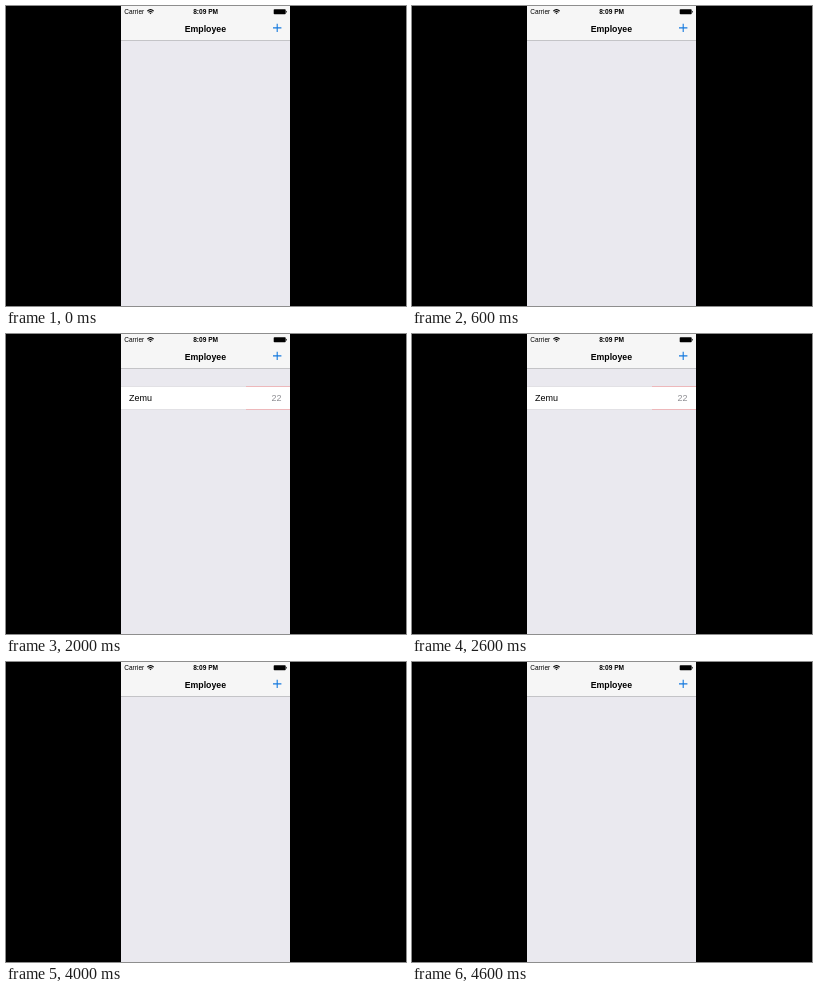
An HTML page for the animation above (5000 ms loop, 400 by 300 pixels).

```html
<!DOCTYPE html>
<html lang="en">
<head>
<meta charset="utf-8">
<title>Employee list</title>
<style>
  html, body { margin: 0; width: 100%; height: 100%; overflow: hidden; background: #000; }
  svg { display: block; width: 400px; height: 300px; }
  text { font: 9px "Liberation Sans", Arial, sans-serif; }
  .bold { font-size: 8.75px; font-weight: bold; }
  .status { font-size: 6.5px; }
  .mid { text-anchor: middle; }
  .end { text-anchor: end; }
  .blue { fill: #0a6cf5; }
  .hint { fill: #c0c0c4; }
  .grey { fill: #8e8e93; }
  .field { fill: #fff; stroke: #dcdcdc; stroke-width: .8; }
  .line { fill: #cfced4; }

  .list, .form, .row, .slide { animation: 5s step-end infinite; }
  .list { animation-name: list; }
  .form { animation-name: form; }
  .row { animation-name: row; }
  .slide { animation-name: slide; }
  @keyframes list { 0%, 40% { visibility: visible } 20% { visibility: hidden } }
  @keyframes form { 0%, 40% { visibility: hidden } 20% { visibility: visible } }
  @keyframes row { 0%, 80% { visibility: hidden } 40% { visibility: visible } }
  @keyframes slide { 0%, 80% { transform: none } 60% { transform: translateX(-43.5px) } }
</style>
</head>
<body>
<svg viewBox="0 0 400 300">
  <clipPath id="screen"><rect x="115" width="169" height="300"/></clipPath>
  <rect width="400" height="300"/>
  <g clip-path="url(#screen)">
    <rect x="115" width="169" height="300" fill="#fff"/>
    <rect class="list" x="115" y="34" width="169" height="266" fill="#eae9ef"/>

    <!-- bars -->
    <rect x="115" width="169" height="34" fill="#f6f6f6"/>
    <rect x="115" y="34" width="169" height="1" fill="#c4c4c7"/>
    <text class="status" x="118.3" y="8.2">Carrier</text>
    <g fill="none" stroke="#000" stroke-width="1.1">
      <path d="M141.3 5.1q3.2-2.9 6.4 0M142.5 6.4q2-1.7 4 0"/>
    </g>
    <path d="M143.5 7.1q1-.7 2 0l-1 1.2z"/>
    <text class="status bold mid" x="199.6" y="8.2" style="font-size:6.6px">8:09 PM</text>
    <rect x="267.7" y="3.2" width="12" height="5" rx=".8"/>
    <rect x="280.1" y="4.8" width=".8" height="1.8" rx=".4"/>

    <g class="list">
      <text class="bold mid" x="199.4" y="25.7">Employee</text>
      <path d="M267 21.9h8.4M271.2 17.7v8.4" stroke="#1579de" stroke-width="1.1"/>
    </g>

    <g class="form">
      <path d="M125.6 17.8l-4.8 4.8 4.8 4.8" fill="none" stroke="#0a6cf5" stroke-width="1.6"/>
      <text class="blue" x="129.2" y="25.7">Employee</text>
      <text class="bold mid" x="202.7" y="25.7">Add Employee</text>
      <text class="bold blue end" x="279.5" y="25.7">Save</text>
      <rect class="field" x="141.7" y="53.3" width="105" height="15.6" rx="2.4"/>
      <text class="hint" x="145.2" y="64">Name</text>
      <rect class="field" x="141.7" y="79.6" width="105" height="15.6" rx="2.4"/>
      <text class="hint" x="145.2" y="90.2">Age</text>
    </g>

    <g class="row">
      <rect class="line" x="115" y="52" width="169" height="24"/>
      <rect x="240" y="52.6" width="44" height="22.8" fill="#fc2125"/>
      <text class="mid" x="262" y="67.3" fill="#fff" style="font-size:9.4px">Delete</text>
      <g class="slide">
        <rect x="115" y="52.6" width="169" height="22.8" fill="#fff"/>
        <text x="123" y="67.3">Zemu</text>
        <text class="grey end" x="275.6" y="67.3">22</text>
      </g>
    </g>
  </g>
</svg>
</body>
</html>
```
